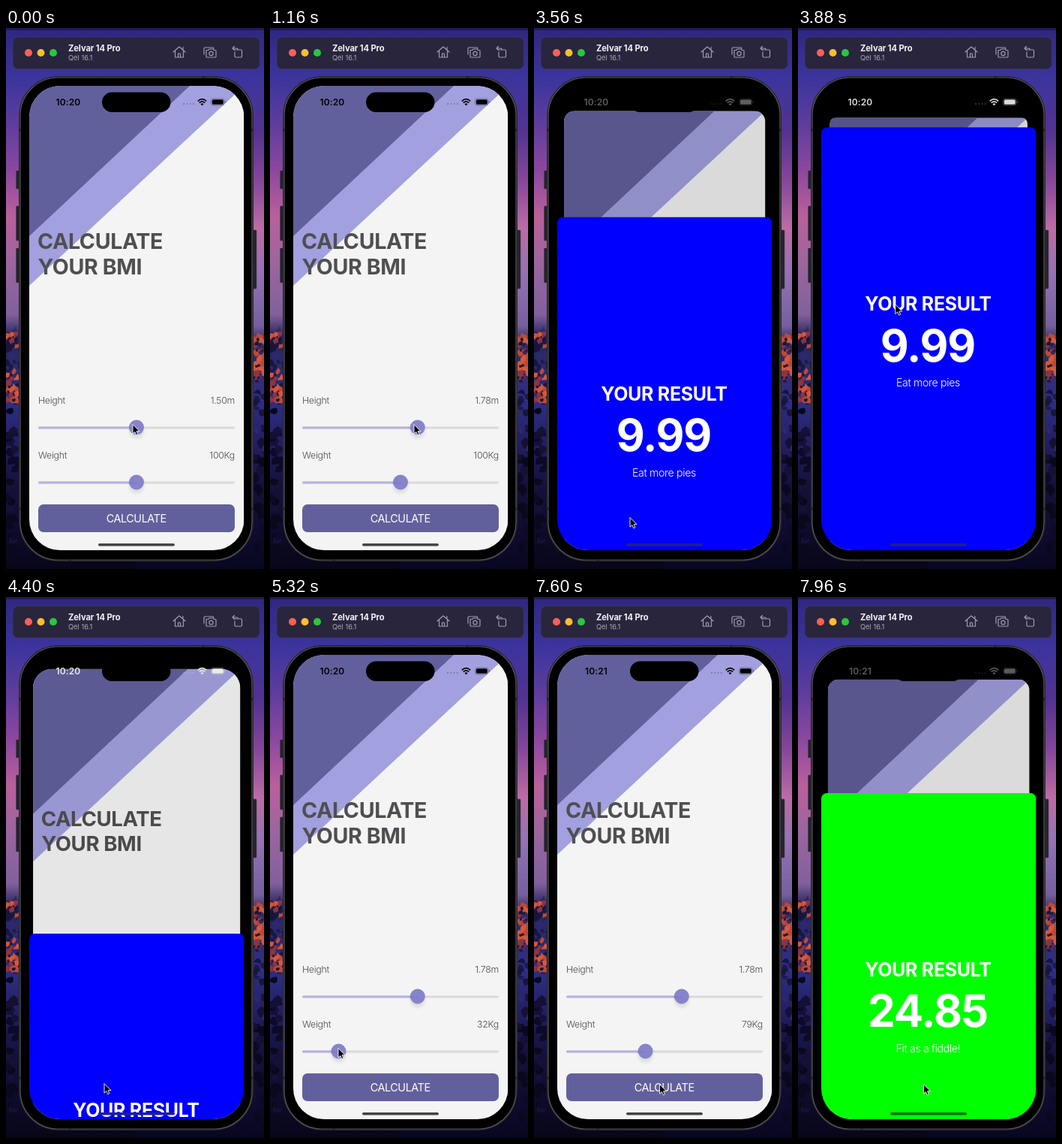
An HTML page that plays this animation: 344 by 720 pixels, repeating every 8000 ms.

```html
<!DOCTYPE html>
<html lang="en">
<head>
<meta charset="utf-8">
<title>BMI calculator</title>
<style>
  html, body { margin: 0; width: 100%; height: 100%; overflow: hidden; background: #0c0a28; }
  svg { display: block; width: 100vw; height: 100vh; }
  text { font-family: Inter, "Open Sans", sans-serif; letter-spacing: -.03em; }
  .title { font-size: 28.6px; font-weight: 700; fill: #4f4f52; letter-spacing: -.014em; }
  .label { font-size: 12.3px; font-weight: 300; fill: #4c4c50; letter-spacing: -.02em; }
  .end { text-anchor: end; }
  .mid { text-anchor: middle; }
  .icon { fill: none; stroke: #a09caf; stroke-width: 1.2; stroke-linejoin: round; stroke-linecap: round; }
</style>
</head>
<body>
<svg viewBox="0 0 344 720" preserveAspectRatio="none">
  <defs>
    <linearGradient id="skyL" x2="0" y2="1">
      <stop offset="0" stop-color="#2e2780"/><stop offset=".09" stop-color="#3b349d"/>
      <stop offset=".17" stop-color="#5b3c9c"/><stop offset=".26" stop-color="#8a479f"/>
      <stop offset=".35" stop-color="#b9609c"/><stop offset=".44" stop-color="#9a659f"/>
      <stop offset=".53" stop-color="#80609c"/><stop offset=".57" stop-color="#2a2458"/>
      <stop offset=".7" stop-color="#2d2c80"/><stop offset=".84" stop-color="#15123f"/>
      <stop offset="1" stop-color="#070618"/>
    </linearGradient>
    <linearGradient id="skyR" x2="0" y2="1">
      <stop offset="0" stop-color="#2e2780"/><stop offset=".09" stop-color="#3b349d"/>
      <stop offset=".19" stop-color="#533292"/><stop offset=".28" stop-color="#84469a"/>
      <stop offset=".37" stop-color="#bd6ba4"/><stop offset=".45" stop-color="#9672b5"/>
      <stop offset=".55" stop-color="#74609f"/><stop offset=".58" stop-color="#3b2a5a"/>
      <stop offset=".69" stop-color="#2f2d88"/><stop offset=".84" stop-color="#17113f"/>
      <stop offset="1" stop-color="#080720"/>
    </linearGradient>
    <clipPath id="screen"><rect x="31" y="77" width="286.5" height="618" rx="41"/></clipPath>
    <clipPath id="cardShape"><rect id="cardRect" x="31" y="77" width="286.5" height="680"/></clipPath>
    <filter id="soft" x="-50%" y="-50%" width="200%" height="200%"><feGaussianBlur stdDeviation="2"/></filter>
    <g id="thumb">
      <circle cy="5" r="10" fill="#000" opacity=".09" filter="url(#soft)"/>
      <circle r="10" fill="#8784cc"/>
      <path d="M-10 1H0" stroke="#817ec4" stroke-width="2.5"/>
    </g>
  </defs>

  <rect width="180" height="720" fill="url(#skyL)"/>
  <rect x="172" width="172" height="720" fill="url(#skyR)"/>
  <rect width="344" height="3" fill="#211a52"/>
  <g id="rocks"></g>

  <!-- window bar -->
  <rect x="9" y="12" width="329.5" height="42.5" rx="7" fill="#29253d" stroke="#453f60" stroke-width=".6"/>
  <circle cx="30" cy="33" r="5" fill="#ff5f57"/>
  <circle cx="46.5" cy="33" r="5" fill="#febc2e"/>
  <circle cx="63" cy="33" r="5" fill="#28c840"/>
  <text x="83" y="31" font-size="11.2" font-weight="700" fill="#f4f3f7" style="letter-spacing:-.01em">Zelvar 14 Pro</text>
  <text x="83" y="43" font-size="9.3" fill="#aaa7b5" style="letter-spacing:0">Qel 16.1</text>
  <g class="icon">
    <path d="M223 32L231 25L239 32M225.500 30.500V39H236.500V30.500M229.500 39V34H232.500V39M236 25.500V28"/>
    <path d="M264 35V27.500Q264 26 265.500 26H275.500Q277 26 277 27.500"/>
    <path d="M267 29.500H270L271 28H276L277 29.500H279Q280 29.500 280 30.500V38Q280 39 279 39H268Q267 39 267 38Z"/>
    <circle cx="273.500" cy="34" r="2.600"/>
    <path d="M304 29H313Q314.500 29 314.500 30.500V37.500Q314.500 39 313 39H306.500Q305 39 305 37.500V32M302 27H307Q309.500 27 309.500 29M304.500 24.500L302 27L304.500 29.500"/>
  </g>

  <!-- device -->
  <g fill="#25232c" stroke="#403d49" stroke-width=".5">
    <rect x="13.500" y="190" width="5" height="24" rx="1"/>
    <rect x="13.500" y="237" width="5" height="46" rx="1"/>
    <rect x="13.500" y="293" width="5" height="46" rx="1"/>
    <rect x="329" y="269" width="5" height="78" rx="1"/>
  </g>
  <rect x="17.500" y="64.500" width="312" height="645" rx="52" fill="#111" stroke="#29272d"/>
  <rect x="19" y="66" width="309" height="642" rx="50.500" fill="#000" stroke="#5c5a5f" stroke-width="1.200"/>
  <path d="M261 65.500h4M83 708.500h4M18.500 134v4M328.500 134v4M18.500 638v4M328.500 638v4" stroke="#222" stroke-width="2"/>

  <g clip-path="url(#screen)">
    <g id="card">
      <g clip-path="url(#cardShape)">
        <rect x="31" y="77" width="286.500" height="640" fill="#f4f4f4"/>
        <path d="M31 77H317.500L31 343Z" fill="#a2a0df"/>
        <path d="M31 77H245L31 277Z" fill="#62609c"/>
        <text class="title" x="42" y="293.500">CALCULATE</text>
        <text class="title" x="42.500" y="328">YOUR BMI</text>
        <text class="label" x="43" y="499.500">Height</text>
        <text class="label end" id="height" x="305" y="499.500"></text>
        <text class="label" x="43" y="572.500">Weight</text>
        <text class="label end" id="weight" x="305" y="572.500"></text>
        <g stroke-width="3" stroke-linecap="round">
          <path d="M44.500 532H303.500M44.500 605H303.500" stroke="#dadadb"/>
          <path id="fills" stroke="#b5b2e0"/>
        </g>
        <use href="#thumb" id="heightThumb"/>
        <use href="#thumb" id="weightThumb"/>
        <rect x="43" y="634" width="262" height="37" rx="7" fill="#62609c"/>
        <text class="mid" x="173.700" y="657.700" font-size="14.400" fill="#fff">CALCULATE</text>
        <rect id="dim" x="31" y="77" width="286.500" height="640"/>
      </g>
    </g>
    <g id="sheet" fill="#fff">
      <rect id="sheetFill" x="31" width="286.500" height="640" rx="7.500"/>
      <text class="mid" x="173.500" y="244" font-size="25" font-weight="700" style="letter-spacing:-.013em">YOUR RESULT</text>
      <text class="mid" id="bmi" x="173" y="311.500" font-size="58.500" font-weight="700" style="letter-spacing:-.02em"></text>
      <text class="mid" id="advice" x="173.500" y="345" font-size="14.200" font-weight="300" style="letter-spacing:-.025em"></text>
    </g>
    <rect id="homeBar" x="123" y="686" width="102" height="3.600" rx="1.800"/>
  </g>

  <rect x="128" y="85.500" width="91.500" height="26.500" rx="13.250" fill="#000"/>
  <g id="status">
    <text class="mid" id="clock" x="83" y="103" font-size="12" font-weight="600" fill="currentColor" style="letter-spacing:.01em"></text>
    <path d="M237 101h13" stroke="currentColor" opacity=".28" stroke-width="2" stroke-linecap="round" stroke-dasharray="0 4.300"/>
    <path d="M255.800 97.300Q261.500 92 267.200 97.300M257.800 99.600Q261.500 96.200 265.200 99.600" fill="none" stroke="currentColor" stroke-width="1.800"/>
    <path d="M259.500 101.200Q261.500 99.500 263.500 101.200L261.500 103.300Z" fill="currentColor"/>
    <rect x="273.500" y="94" width="17.500" height="9" rx="2.800" fill="none" stroke="currentColor" opacity=".4" stroke-width=".8"/>
    <rect x="274.800" y="95.200" width="15" height="6.600" rx="1.900" fill="currentColor"/>
    <path d="M292.300 97.200v2.600" stroke="currentColor" opacity=".45"/>
  </g>
  <path id="cursor" d="M0 0V12.600L2.900 10L4.800 14.200L6.900 13.300L5.100 9.200H9Z" fill="#000" stroke="#fff" stroke-width=".9"/>
</svg>
<script>
const $ = id => document.getElementById(id);
const LOOP = 8000, STEP = 40;
const SHOWN_TOP = 127, HIDDEN_TOP = 695;
const clamp = v => Math.min(1, Math.max(0, v));
const smooth = u => u * u * (3 - 2 * u);

// Eased interpolation through [time, value] pairs
function track(keys, t) {
  if (t <= keys[0][0]) return keys[0][1];
  for (let i = 1; i < keys.length; i++) {
    const [t0, a] = keys[i - 1], [t1, b] = keys[i];
    if (t < t1) return a + (b - a) * smooth((t - t0) / (t1 - t0));
  }
  return keys[keys.length - 1][1];
}

const heightKeys = [[120, 1.5], [1080, 1.783]];
const weightKeys = [[1720, 100], [2740, 31.8], [5360, 31.8], [6520, 79]];
const cursorX = [[120, 169], [1080, 192], [1200, 192], [1640, 170.5], [1720, 170.5], [2740, 88.2],
  [2820, 88.2], [3200, 128], [3600, 128], [3960, 130], [4400, 131], [4600, 131], [5160, 91],
  [5360, 91], [6520, 148], [6640, 148], [7200, 167.5]];
const cursorY = [[1200, 527.5], [1640, 600], [1720, 600], [2740, 592],
  [2820, 592], [3200, 651.5], [3600, 651.5], [3960, 327], [4040, 327], [4400, 647.5], [4600, 647.5], [5160, 600.5],
  [5360, 600.5], [6520, 601], [6640, 601], [7200, 648.5]];

const OPEN_A = 3321, DRAG = 4040, RELEASE = 4400, CLOSED = 4800, OPEN_B = 7729;

function spring(ms) {
  const x = Math.max(0, ms) * 0.012;
  return 1 - (1 + x) * Math.exp(-x);
}

function presented(t) {
  if (t >= OPEN_B) return spring(t - OPEN_B);
  if (t < DRAG) return spring(t - OPEN_A);
  if (t < RELEASE) return 1 - 0.565 * smooth((t - DRAG) / (RELEASE - DRAG));
  return 0.435 * (1 - clamp((t - RELEASE) / (CLOSED - RELEASE))) ** 2;
}

function statusLight(t) {
  if (t >= OPEN_B) return clamp((t - OPEN_B) / 600);
  return clamp((t - OPEN_A) / 600) * (1 - clamp((t - RELEASE - 40) / 320));
}

function draw(t) {
  const height = track(heightKeys, t), weight = track(weightKeys, t);
  const hx = 53 + 242 * height / 3, wx = 53 + 242 * weight / 200;
  $("height").textContent = (Math.floor(height * 100 + 1e-6) / 100).toFixed(2) + "m";
  $("weight").textContent = Math.round(weight) + "Kg";
  $("fills").setAttribute("d", `M44.5 532H${hx}M44.5 605H${wx}`);
  $("heightThumb").setAttribute("transform", `translate(${hx} 531.5)`);
  $("weightThumb").setAttribute("transform", `translate(${wx} 604.5)`);

  const p = presented(t), fit = t > 6000;
  $("card").setAttribute("transform",
    `translate(174 ${77 + 43 * p}) scale(${1 - 0.081 * p}) translate(-174 -77)`);
  $("cardRect").setAttribute("rx", 41 - 33 * p);
  $("dim").setAttribute("opacity", 0.135 * p);
  $("sheet").setAttribute("transform", `translate(0 ${HIDDEN_TOP + (SHOWN_TOP - HIDDEN_TOP) * p})`);
  $("sheet").setAttribute("visibility", p > 0.001 ? "visible" : "hidden");
  $("sheetFill").setAttribute("fill", fit ? "#00ff00" : "#0000ff");
  $("bmi").textContent = fit ? "24.85" : "9.99";
  $("advice").textContent = fit ? "Fit as a fiddle!" : "Eat more pies";
  $("homeBar").setAttribute("fill", p < 0.02 ? "#454547" : fit ? "#066a06" : "#20208c");

  const tone = Math.round(235 * statusLight(t));
  $("status").setAttribute("color", `rgb(${tone},${tone},${tone})`);
  $("clock").textContent = t < 6800 ? "10:20" : "10:21";
  $("cursor").setAttribute("transform", `translate(${track(cursorX, t)} ${track(cursorY, t)})`);
}

// Craggy slopes along both edges of the wallpaper
let seed = 11;
const rand = () => (seed = seed * 16807 % 2147483647) / 2147483647;
function crags(x, from, to, count, size, colors) {
  let out = "";
  for (let i = 0; i < count; i++) {
    const cx = x + rand() * 16, cy = from + rand() * (to - from), turn = rand() * 6.28;
    let points = "";
    for (let k = 0; k < 6; k++) {
      const angle = turn + k * 1.047, r = size * (0.35 + rand() * 0.8);
      points += `${cx + r * Math.cos(angle)},${cy + r * Math.sin(angle)} `;
    }
    out += `<polygon points="${points}" fill="${colors[i % colors.length]}"/>`;
  }
  return out;
}
const glow = ["#bd4936", "#8c3440", "#d3593b"], shade = ["#17153b", "#2c2a6c", "#1d1949"];
const night = ["#0c0a26", "#141036", "#09081c"];
$("rocks").innerHTML =
  crags(0, 402, 500, 26, 7, shade) + crags(0, 408, 425, 6, 5, glow) + crags(0, 457, 496, 16, 6, glow) +
  crags(0, 410, 500, 12, 3, shade) + crags(0, 510, 700, 26, 8, night) +
  crags(330, 408, 466, 22, 7, glow) + crags(330, 410, 470, 14, 3.5, shade) +
  crags(330, 475, 560, 10, 6, shade) + crags(330, 550, 700, 20, 8, night);

const start = performance.now();
function frame() {
  const t = (performance.now() - start) % LOOP;
  draw(Math.floor(t / STEP) * STEP);
  requestAnimationFrame(frame);
}
frame();
</script>
</body>
</html>
```
